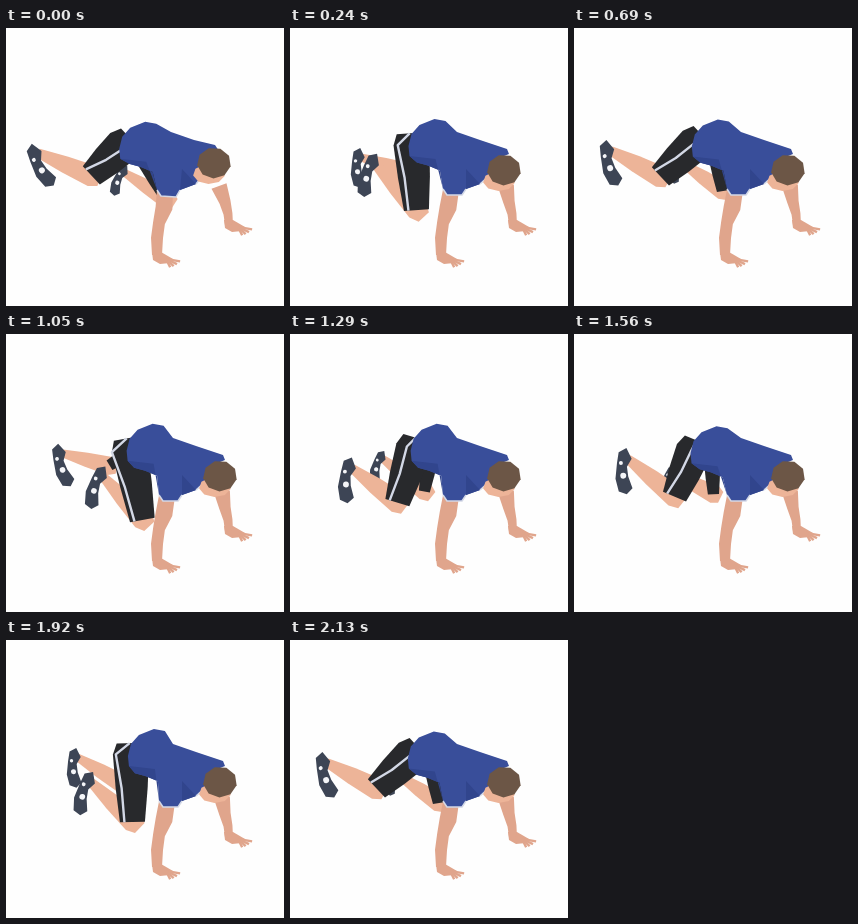
Recreate the animation shown at these times as an HTML page. Size 278x278 px, loop 2160 ms.

```html
<!DOCTYPE html>
<html lang="en">
<head>
<meta charset="utf-8">
<title>Mountain climber</title>
<style>
  html, body { margin: 0; width: 100%; height: 100%; overflow: hidden; background: #fefefe; }
  svg { display: block; width: 100vw; height: 100vh; }
</style>
</head>
<body>
<svg id="stage" viewBox="0 0 278 278"></svg>
<script>
const PERIOD = 720, STEP = 30;
const SKIN = '#edb498', SKIN_DARK = '#e0a58c', BLUE = '#394e9a', NAVY = '#31458d';
const CLOTH = '#28292c', SHOE = '#3d4555', HAIR = '#6c5646', WHITE = '#f4f5f8', TRIM = '#d3d8e6';

// Each leg swings from its extended pose to its tucked pose
const NEAR = {
  lag: 0, girth: 1, kick: 3.5, turn: [73, 107], size: [1, .95],
  hip: [[121, 117], [121, 117]], knee: [[86, 148], [138, 186]], ankle: [[35, 121], [98, 144]]
};
const FAR = {
  lag: PERIOD / 2, girth: .85, kick: 7, turn: [71, 112], size: [.95, .6],
  hip: [[126, 118], [143, 130]], knee: [[103, 131], [150, 163]], ankle: [[55, 117], [110, 138]]
};

const mix = (a, b, t) => a + (b - a) * t;
const mixPoint = ([a, b], t) => [mix(a[0], b[0], t), mix(a[1], b[1], t)];
const add = ([x, y], dx, dy) => [x + dx, y + dy];
const fmt = points => points.map(p => p.map(v => v.toFixed(2)).join()).join(' ');
const poly = (points, fill) => `<polygon points="${fmt(points)}" fill="${fill}"/>`;
const line = (points, color, width) =>
  `<polyline points="${fmt(points)}" fill="none" stroke="${color}" stroke-width="${width}" stroke-linejoin="round"/>`;

// Places points by distance along and across the line from a to b
function axis(a, b) {
  const dx = b[0] - a[0], dy = b[1] - a[1], length = Math.hypot(dx, dy);
  const at = (u, v) => [a[0] + (u * dx - v * dy) / length, a[1] + (u * dy + v * dx) / length];
  return { length, at };
}

// A band around a spine of [x, y, half width]
function ribbon(spine, fill) {
  const side = sign => spine.map(([x, y, w], i) => {
    const a = spine[Math.max(0, i - 1)], b = spine[Math.min(spine.length - 1, i + 1)];
    return add(axis(a, b).at(0, sign * w), x - a[0], y - a[1]);
  });
  return poly([...side(1), ...side(-1).reverse()], fill);
}

function facets(cx, cy, rx, ry, count, fill) {
  const points = Array.from({ length: count }, (_, i) => {
    const angle = 2 * Math.PI * (i + .3) / count;
    return [cx + rx * Math.cos(angle), cy + ry * Math.sin(angle)];
  });
  return poly(points, fill);
}

function shoe([x, y], angle, size) {
  const outline = [[-11, 1], [-7, 9], [4, 11], [20, 13], [33, 10], [36, 2], [30, -4], [18, 0], [8, 1], [0, -4]];
  return `<g transform="translate(${x} ${y}) rotate(${angle}) scale(${size})">${poly(outline, SHOE)}`
    + `<circle cx="17" cy="5" r="3" fill="${WHITE}"/><circle cx="4" cy="7" r="2" fill="${WHITE}"/></g>`;
}

function leg(spec, phase, jolt, pelvis) {
  const turn = 2 * Math.PI * (phase + spec.lag) / PERIOD;
  const swing = (1 - Math.cos(turn)) / 2, bow = Math.sin(turn) ** 2;
  const tuck = swing + bow / 16;
  const hip = add(mixPoint(spec.hip, tuck), ...pelvis);
  const knee = add(mixPoint(spec.knee, tuck), 12 * jolt * tuck, 5 * bow + 9 * jolt * tuck);
  const ankle = add(mixPoint(spec.ankle, tuck), mix(-3, 9, tuck) * jolt,
    mix(4, 7, tuck) * jolt - spec.kick * Math.sin(turn));
  const angle = mix(...spec.turn, tuck) + 7 * bow - 12 * jolt * (1 - tuck);

  const g = spec.girth, shin = axis(ankle, knee), thigh = axis(hip, knee);
  const l = thigh.length;
  const calf = [[0, 4.5], [.5, 8.5], [1, 11], [1.15, 7]]
    .map(([t, w]) => [...shin.at(t * shin.length, 0), w * g]);
  const shorts = [[-11, 14], [0, 18], [l / 2, 16], [l, 12.5]]
    .map(([u, w]) => [...thigh.at(u, 1), w * g ** 5]);
  const flare = (l - 45) * .7;
  const stripe = [thigh.at(l, 9), thigh.at(l / 2, 3 + flare / 2), thigh.at(0, flare), thigh.at(-11, 2)];
  return ribbon(calf, SKIN) + shoe(ankle, angle, mix(...spec.size, tuck) + .1 * jolt * tuck)
    + ribbon(shorts, CLOTH) + (spec === NEAR ? line(stripe, TRIM, 2.4) : '');
}

function hand(x, y) {
  const palm = [[-5, -3], [-4, 5], [3, 9], [13, 8], [16, 4], [4, -3]];
  let svg = poly(palm.map(p => add(p, x, y)), SKIN_DARK);
  for (let i = 0; i < 4; i++) {
    const angle = .27 + .16 * i, reach = 24 - 2 * i;
    svg += line([[x + 9, y + 4], [x + reach * Math.cos(angle), y + reach * Math.sin(angle)]], SKIN_DARK, 2.4);
  }
  return svg;
}

const farArm = jolt => hand(223, 195)
  + ribbon([[216 - 3 * jolt, 158, 8], [219, 174, 5.7], [222, 186, 4.5], [223, 197, 4]], SKIN_DARK);

const nearArm = jolt => hand(151, 227)
  + ribbon([[161 - 2 * jolt, 162, 8], [158, 180, 8.5], [153, 195, 6], [151, 210, 6], [151, 227, 5]], SKIN_DARK);

function torso(pelvis, jolt) {
  const [px, py] = pelvis;
  const rump = [[118, 129], [117, 119], [120, 107], [128, 98], [143, 92], [154, 94]].map(p => add(p, px, py));
  const belly = [[149, 143], [137, 138], [126, 135]].map(p => add(p, px * .6, py * .6));
  const cuff = [[153, 161], [157, 167], [172, 167 + jolt], [176, 161]].map(p => add(p, -2 * jolt, jolt));
  const collar = [[190, 156], [200, 147], [204, 132], [219, 126], [217, 121]]
    .map(([x, y], i) => [x - 2 * jolt * i, y - jolt * i]);
  const shoulder = [[190, 112], [167, 104]].map(p => add(p, -2 * jolt, 0));
  const fold = [[176, 141], collar[0], cuff[3]];
  return poly([...rump, ...shoulder.reverse(), ...collar.slice().reverse(), ...cuff.slice().reverse(), ...belly], BLUE)
    + poly([rump[0], add(rump[0], 26, 3), cuff[0], ...belly], NAVY) + poly(fold, NAVY)
    + line(cuff, TRIM, 1.5) + line(collar.slice(0, 2), TRIM, 1.5);
}

const head = jolt => `<g transform="translate(${-6 * jolt} ${-7 * jolt})">`
  + facets(209, 153, 16, 10, 9, SKIN) + facets(214, 142, 17, 15.5, 9, HAIR) + '</g>';

const stage = document.getElementById('stage');

function draw(time) {
  const phase = Math.floor(time / STEP) * STEP % PERIOD;
  // The body snaps back at each foot change, then settles
  const rest = Math.min(1, phase % (PERIOD / 2) / 110);
  const jolt = 1 - rest * rest * (3 - 2 * rest);
  const sway = 2.2 - 2.8 * Math.cos(2 * Math.PI * (phase - 90) / PERIOD);
  const pelvis = [sway - 4 * jolt, 2 * jolt - .6 * sway];
  stage.innerHTML = leg(FAR, phase, jolt, pelvis) + farArm(jolt)
    + leg(NEAR, phase, jolt, pelvis) + nearArm(jolt) + torso(pelvis, jolt) + head(jolt);
}

function tick() {
  draw(performance.now());
  requestAnimationFrame(tick);
}
tick();
</script>
</body>
</html>
```
